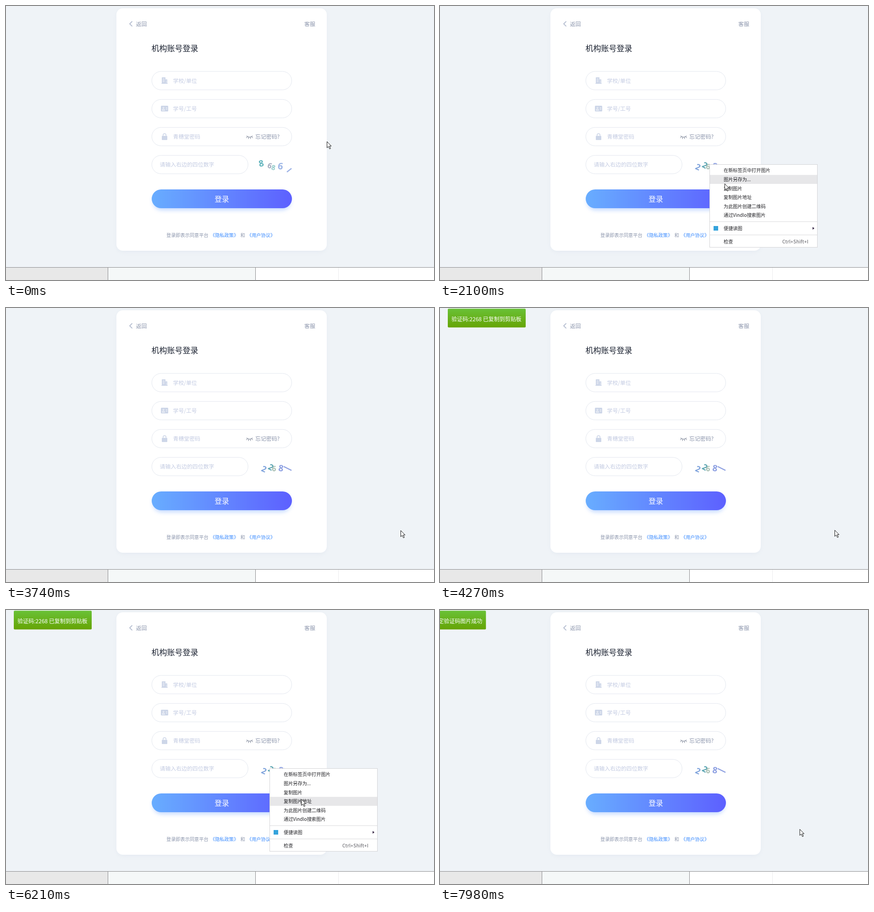
Recreate the animation shown at these times as an HTML page. Size 934x599 px, loop 8000 ms.

```html
<!DOCTYPE html>
<html lang="zh-CN">
<meta charset="utf-8">
<title>登录</title>
<style>
  html, body { margin: 0; width: 100%; height: 100%; overflow: hidden; background: #eff3f7 }
  svg { display: block; width: 100vw; height: 100vh; font: 11.9px "Noto Sans CJK SC", "Noto Sans CJK", sans-serif }
  .field { fill: #fff; stroke: #e3e7ef }
  .hint { fill: #c3cbe2 }
  .grey { fill: #8a94ab }
  .icon { fill: #cdd6e8 }
  .small { font-size: 10.2px }
  .link { fill: #3a8bff }
  .box { fill: #fff; stroke: #d3d3d6 }
  .item { fill: #222226 }
  .digit { font: bold 19px "Open Sans", sans-serif; text-anchor: middle }
</style>
<svg viewBox="0 0 934 599">
  <defs>
    <linearGradient id="blue"><stop stop-color="#68adff"/><stop offset="1" stop-color="#5d60ff"/></linearGradient>
    <linearGradient id="green" x2="0" y2="1"><stop stop-color="#69c136"/><stop offset="1" stop-color="#66a405"/></linearGradient>
    <filter id="soft" x="-20%" y="-20%" width="140%" height="160%"><feGaussianBlur stdDeviation="5"/></filter>
  </defs>

  <!-- page -->
  <rect width="934" height="599" fill="#eff3f7"/>
  <rect x="242" y="8" width="457" height="530" rx="14" fill="#dfe5ee" opacity=".6" filter="url(#soft)"/>
  <rect x="241" y="5" width="459" height="530" rx="14" fill="#fff"/>
  <path d="M275.5 33.5l-5.5 5.5 5.5 5.5" fill="none" stroke="#a8b2c8" stroke-width="1.6"/>
  <g class="grey"><text x="283.5" y="43.6">返回</text><text x="651" y="43.6">客服</text></g>
  <text x="317.5" y="99.4" font-size="17" fill="#1a2130">机构账号登录</text>
  <g class="field">
    <rect x="318.2" y="143" width="305.3" height="40.3" rx="20.2"/>
    <rect x="318.2" y="204.3" width="305.3" height="40.3" rx="20.2"/>
    <rect x="318.2" y="265.4" width="305.3" height="40.3" rx="20.2"/>
    <rect x="318.2" y="326.5" width="210" height="40.3" rx="20.2"/>
  </g>
  <g class="hint">
    <text x="364.5" y="167.6">学校/单位</text>
    <text x="364.5" y="228.8">学号/工号</text>
    <text x="364.5" y="290">青穗堂密码</text>
    <text x="335.5" y="351.2">请输入右边的四位数字</text>
  </g>
  <text class="grey" x="544" y="290">忘记密码?</text>
  <path d="M525 284q6.500 5.500 13 0M526.500 286l-2 2.500M529.800 287.500l-.8 3M533.200 287.500l.8 3M536.500 286l2 2.500" fill="none" stroke="#838b9c" stroke-width="1.200"/>
  <g class="icon">
    <path d="M340 156h8v4.500h4v8.500h1v1h-14v-1h1z"/>
    <rect x="338" y="218" width="16" height="12.500" rx="1.500"/>
    <rect x="340" y="284" width="12" height="9" rx="1"/>
  </g>
  <path d="M342.800 284v-1.800a3.200 3.200 0 0 1 6.400 0v1.800" fill="none" stroke="#cdd6e8" stroke-width="1.600"/>
  <path d="M342 159.500h4M342 162.500h4M342 165.500h4M349 164h2M349 167h2M349 222.500h3M349 225.500h3M341 228v-1.500q2.500-2.500 5 0v1.500zM342.300 222.500a1.300 1.300 0 1 0 2.600 0a1.300 1.300 0 1 0-2.600 0" fill="none" stroke="#fff" stroke-width=".9"/>
  <rect x="321" y="407" width="300" height="39" rx="19" fill="#8fb8ff" opacity=".55" filter="url(#soft)"/>
  <rect x="318" y="401" width="306" height="41" rx="20.500" fill="url(#blue)"/>
  <text x="471" y="428" font-size="15.8" fill="#fff" text-anchor="middle">登录</text>
  <g class="small grey">
    <text x="350" y="505">登录即表示同意平台</text><text x="511.500" y="505">和</text>
    <text class="link" x="446" y="505">《隐私政策》</text><text class="link" x="526" y="505">《用户协议》</text>
  </g>
  <rect y="571" width="222" height="28" fill="#e8e8e8"/>
  <rect x="222" y="571" width="322" height="28" fill="#f5f8f8"/>
  <rect x="544" y="571" width="390" height="28" fill="#fff"/>
  <path d="M725.500 572v27" stroke="#ebebed"/>
  <path d="M0 571.500h934M222.500 571v28M544.500 571v28" stroke="#8b8b8d"/>

  <g id="codes"></g>
  <g id="toast">
    <rect id="toastBox" y="1.500" height="41" rx="2" fill="url(#green)"/>
    <text id="toastText" x="8" y="28.600" font-size="12" fill="#fff"></text>
  </g>
  <g id="menu" class="small"></g>
  <circle id="ring" r="10"/>
  <g id="cursor" fill="#fff" stroke="#111" stroke-linejoin="round">
    <path id="arrow" d="M.5.5v13.500l3.200-3 2.500 5.500 2.200-1-2.500-5.300h4z"/>
    <path id="hand" d="M-.5 11V1.500a1.600 1.600 0 0 1 3.200 0V7.500a1.400 1.400 0 0 1 2.600 .5a1.400 1.400 0 0 1 2.500 .6a1.200 1.200 0 0 1 2.200 .6V14q0 3-2 5.500H1.500q-1-3-5.500-7.500q-.5-2 1.500-1.800z"/>
  </g>
</svg>
<script>
const $ = id => document.getElementById(id);
const show = (el, on) => el.style.display = on ? '' : 'none';

// Each code: digits as [glyph, x, y, turn, size, colour], then a stray line
const codes = [
  { from: 0, line: ['M613 363L623 355', '#9db2e6'], digits: [
    ['8', 557, 344, -12, 19, '#62b4bd'], ['6', 575.5, 349, 18, 16, '#a2a9bd'],
    ['8', 583.5, 353, 12, 15, '#8fcac9'], ['6', 599, 350, 8, 20, '#9db6e6']] },
  { from: 690, line: ['M610 347L623 352', '#93b7dc'], digits: [
    ['4', 559, 350, 15, 19, '#83a6dc'], ['7', 575, 347, -14, 18, '#6cb0b8'],
    ['0', 587, 352, 10, 16, '#9cb6b4'], ['3', 601, 349, -8, 19, '#92a3e0']] },
  { from: 1010, line: ['M606 346.500L623 355', '#8c9fe0'], digits: [
    ['2', 563, 352, 24, 18, '#7fa3dc'], ['2', 578, 348, 28, 18, '#5ba5b1'],
    ['6', 585, 351, 4, 16, '#a6bdb0'], ['8', 600, 350, 8, 19, '#8da0e2']] }];
$('codes').innerHTML = codes.map(c => '<g>' + c.digits.map(([d, x, y, a, size, col]) =>
  `<text class="digit" style="font-size:${size}px" fill="${col}" transform="translate(${x} ${y}) rotate(${a})" y="${size * .36}">${d}</text>`).join('') +
  `<path d="${c.line[0]}" stroke="${c.line[1]}" stroke-width="2.400"/></g>`).join('');

// Context menu, laid out from its top-left corner
const top0 = 346;
const labels = ['在新标签页中打开图片', '图片另存为...', '复制图片', '复制图片地址', '为此图片创建二维码', '通过Vindlo搜索图片', '便捷读图', '检查'];
const rowY = i => i < 6 ? 13.5 + i * 19.6 : i == 6 ? 140 : 169.5;
const subLabels = ['识别验证码', '绑定图片'];
const subX = 233, subY = i => 141 + i * 20;
const label = (s, x, y) => `<text class="item" x="${x}" y="${y + 3.9}">${s}</text>`;
const bar = (x, y, w) => `<rect class="bar" x="${x}" y="${y - 9.8}" width="${w}" height="19.600" fill="#e7e7e9"/>`;
$('menu').innerHTML = '<rect class="box" x=".5" y=".5" width="235" height="181"/>' +
  labels.map((s, i) => bar(1, rowY(i), 234) + label(s, 31, rowY(i))).join('') +
  `<path d="M1 125.500h234M1 154.500h234" stroke="#d9d9dc"/>
   <rect x="9" y="135" width="10" height="10" fill="#35a3dc"/>
   <path d="M225 137l4 3-4 3z" fill="#3a2a48"/>
   <text x="216" y="173.400" fill="#55555c" text-anchor="end" letter-spacing=".3">Ctrl+Shift+I</text>
   <g id="sub"><rect class="box" x="${subX + .5}" y="130.500" width="180" height="41"/>` +
  subLabels.map((s, i) => bar(subX + 1, subY(i), 179) + label(s, subX + 31, subY(i))).join('') + '</g>';
const bars = [...document.querySelectorAll('.bar')];

// Pointer tip: time, x, y
const path = [[0, 700, 296], [70, 700, 296], [530, 588, 346], [1870, 588, 346], [1940, 588, 346],
  [2410, 684, 469], [2790, 688, 483], [2900, 688, 483], [3490, 861, 485], [3740, 861, 486], [4420, 861, 485],
  [5120, 616, 369], [5270, 580, 354], [5430, 575, 346], [5890, 575, 346], [6210, 644, 413],
  [6740, 690, 484], [7370, 837, 504], [7830, 837, 504], [7980, 785, 479], [8000, 778, 476]];
const menus = [
  { x: 588, from: 1870, sub: 2700, to: 3700 },
  { x: 575, from: 5820, sub: 6650, to: 7830 }];
const rings = [[540, 620], [940, 1010], [1720, 1870, 1], [3650, 3730], [5660, 5820, 1], [7680, 7830]];
const toasts = [
  { from: 3790, fade: 6850, w: 170, text: '验证码:2268 已复制到剪贴板' },
  { from: 7920, fade: 9000, w: 124, text: '绑定验证码图片成功' }];
const within = (t, a, b) => t >= a && t < b;
const clamp = v => Math.max(0, Math.min(1, v));

function pointer(t) {
  const i = path.findIndex(p => p[0] > t), a = path[i - 1], b = path[i];
  const u = (t - a[0]) / (b[0] - a[0]);
  return [a[1] + (b[1] - a[1]) * u, a[2] + (b[2] - a[2]) * u];
}

function draw(t) {
  const [x, y] = pointer(t);
  [...$('codes').children].forEach((g, i) => show(g, within(t, codes[i].from, codes[i + 1]?.from ?? 1e9)));

  const m = menus.find(m => within(t, m.from, m.to));
  show($('menu'), m);
  if (m) {
    const open = t >= m.sub, mx = x - m.x, my = y - top0, inSub = open && mx > subX;
    const hit = ry => Math.abs(my - ry) < 9.8;
    $('menu').setAttribute('transform', `translate(${m.x} ${top0})`);
    show($('sub'), open);
    bars.forEach((b, i) => show(b, i < 8
      ? i == 6 && open || !inSub && mx > 1 && hit(rowY(i))
      : inSub && hit(subY(i - 8))));
  }

  const n = toasts.find(n => within(t, n.from, n.fade + 200));
  show($('toast'), n);
  if (n) {
    const u = 1 - (1 - clamp((t - n.from) / 180)) ** 3;
    $('toast').setAttribute('transform', `translate(${17 - (n.w + 17) * (1 - u)} 0)`);
    $('toast').setAttribute('opacity', 1 - clamp((t - n.fade) / 200));
    $('toastBox').setAttribute('width', n.w);
    $('toastText').textContent = n.text;
  }

  const r = rings.find(r => within(t, r[0], r[1]));
  show($('ring'), r);
  if (r) {
    $('ring').setAttribute('fill', r[2] ? 'rgba(255,0,0,.47)' : 'rgba(255,255,0,.47)');
    $('ring').setAttribute('transform', `translate(${x} ${y})`);
  }

  const overCode = !m && within(x, 539, 624) && within(y, 328, 367);
  show($('hand'), overCode);
  show($('arrow'), !overCode);
  $('cursor').setAttribute('transform', `translate(${x} ${y})`);
}

const start = performance.now();
(function loop() {
  draw((performance.now() - start) % 8000);
  requestAnimationFrame(loop);
})();
</script>
</html>
```
